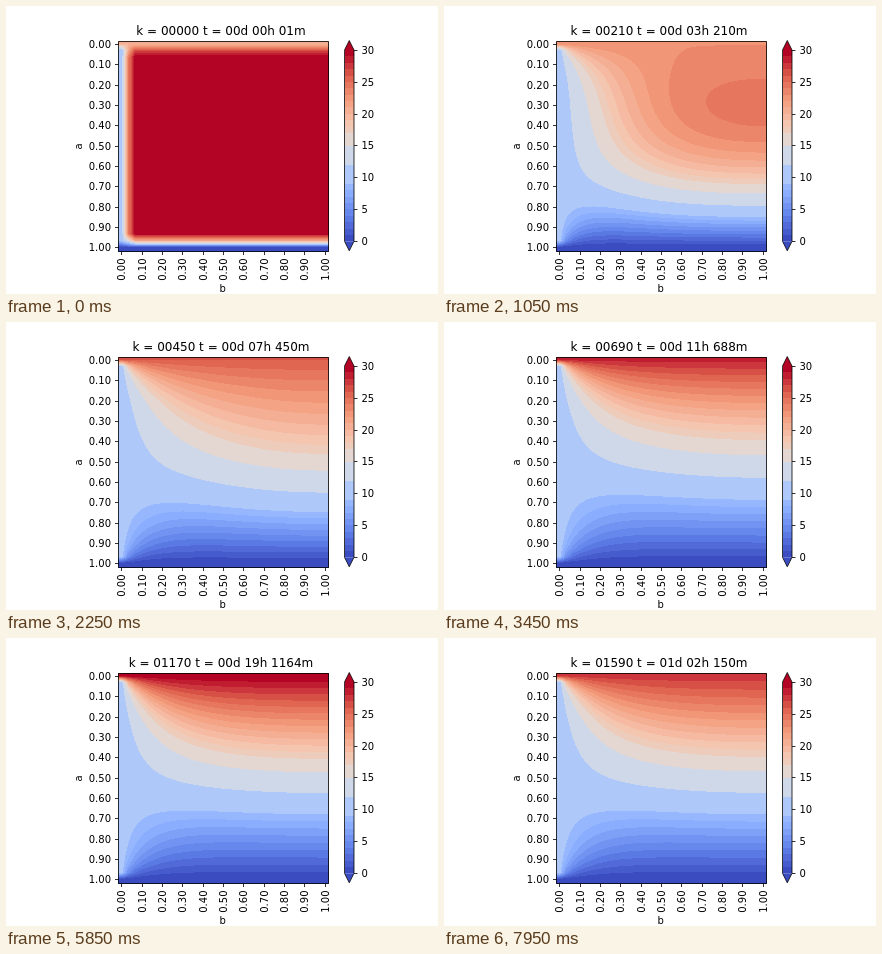
Recreate the animation shown at these times as an HTML page with a canvas. Size 432 by 288 pixels, loop 8 s.

```html
<!DOCTYPE html>
<html lang="en">
<head>
<meta charset="utf-8">
<title>Heat diffusion</title>
<style>
html, body { margin: 0; width: 100%; height: 100%; overflow: hidden; background: #fff; }
#stage { position: relative; width: 432px; height: 288px; overflow: hidden; }
#field { position: absolute; left: 112px; top: 35px; }
svg { position: absolute; left: 0; top: 0; }
text { font: 10px "DejaVu Sans", sans-serif; fill: #000; white-space: pre; }
#title { font-size: 12px; }
.line { fill: none; stroke: #000; stroke-width: 0.8; }
</style>
</head>
<body>
<div id="stage">
  <canvas id="field" width="211" height="211"></canvas>
  <svg id="chart" width="432" height="288" viewBox="0 0 432 288">
    <text id="title" x="215" y="28.5" text-anchor="middle"></text>
    <text x="216.7" y="286" text-anchor="middle">b</text>
    <text transform="translate(76 140.5) rotate(-90)" text-anchor="middle">a</text>
  </svg>
</div>
<script>
const LOOP = 8000, HOLD = 150, FRAMES = 54, STRIDE = 30;
const N = 31, LEVELS = 30;
const LEFT = 112.08, TOP = 34.56, SIZE = 210.24, CELL = SIZE / N;
const FLOW = 0.3;       // diffusion number per minute
const OMEGA = 0.00143;  // surface swing, radians per minute

// ---- colours ----
const STOPS = [
  [59, 76, 192], [98, 130, 234], [141, 176, 254], [184, 208, 249], [221, 221, 221],
  [245, 196, 173], [244, 154, 123], [222, 96, 77], [180, 4, 38]
];

function ramp(f) {
  const p = f * (STOPS.length - 1);
  const i = Math.min(Math.floor(p), STOPS.length - 2);
  return STOPS[i].map((c, j) => Math.round(c + (STOPS[i + 1][j] - c) * (p - i)));
}

// The pale middle levels share tones.
function tone(i) {
  if (i >= 9 && i < 12) return 10;
  if (i >= 12 && i < 15) return 13;
  if (i === 15 || i === 16) return 15.5;
  return i;
}

const palette = Array.from({ length: LEVELS }, (_, i) => ramp(tone(i) / (LEVELS - 1)));
const rgb = c => `rgb(${c.join()})`;

// ---- simulation ----
function edges(u, minute) {
  for (let i = 0; i < N; i++) u[i * N] = 10;
  for (let j = 0; j < N; j++) {
    u[j] = 20 + 10 * Math.sin(OMEGA * minute);
    u[(N - 1) * N + j] = 0;
  }
}

function diffuse(u, r) {
  const v = u.slice();
  for (let i = 1; i < N - 1; i++) {
    for (let j = 1; j < N; j++) {
      const p = i * N + j;
      const right = j < N - 1 ? u[p + 1] : u[p - 1];
      v[p] = u[p] + r * (u[p - N] + u[p + N] + u[p - 1] + right - 4 * u[p]);
    }
  }
  return v;
}

function simulate() {
  const shots = [];
  let u = new Float64Array(N * N).fill(30);
  for (let k = 0; shots.length < FRAMES; k++) {
    edges(u, k);
    if (k === 0) u = diffuse(u, FLOW);
    else u = diffuse(diffuse(u, FLOW / 2), FLOW / 2);
    if (k % STRIDE === 0) shots.push(u);
  }
  return shots;
}

// ---- field ----
const canvas = document.getElementById("field");
const ctx = canvas.getContext("2d");
const image = ctx.createImageData(canvas.width, canvas.height);

function weights(count, start) {
  return Array.from({ length: count }, (_, n) => {
    const p = Math.max(0, Math.min(N - 1, (n + 0.5 + start) / CELL - 0.5));
    const i = Math.min(Math.floor(p), N - 2);
    return { i, f: p - i };
  });
}
const cols = weights(canvas.width, 112 - LEFT);
const rows = weights(canvas.height, 35 - TOP);

function paint(u) {
  let q = 0;
  for (const y of rows) {
    for (const x of cols) {
      const p = y.i * N + x.i;
      const a = u[p] + (u[p + 1] - u[p]) * x.f;
      const b = u[p + N] + (u[p + N + 1] - u[p + N]) * x.f;
      const level = Math.floor((a + (b - a) * y.f) * LEVELS / 30 + 1e-6);
      const c = palette[Math.max(0, Math.min(LEVELS - 1, level))];
      image.data[q++] = c[0];
      image.data[q++] = c[1];
      image.data[q++] = c[2];
      image.data[q++] = 255;
    }
  }
  ctx.putImageData(image, 0, 0);
}

// ---- axes ----
const chart = document.getElementById("chart");

function add(tag, attrs, content) {
  const el = document.createElementNS("http://www.w3.org/2000/svg", tag);
  for (const name in attrs) el.setAttribute(name, attrs[name]);
  if (content !== undefined) el.textContent = content;
  chart.appendChild(el);
}
const line = d => add("path", { class: "line", d });
const snap = v => Math.round(v) + 0.5;

function drawAxes() {
  line("M112.5 35.5H322.5V245.5H112.5Z");
  for (let n = 0; n <= 10; n++) {
    const offset = CELL * (0.5 + 3 * n);
    const x = snap(LEFT + offset - 0.1), y = snap(TOP + offset - 0.1);
    const label = (n / 10).toFixed(2);
    line(`M${x} 245.5v3.5`);
    line(`M112.5 ${y}h-3.5`);
    add("text", { x: 105, y: y + 3.5, "text-anchor": "end" }, label);
    add("text", { transform: `translate(${x + 3.5} 252.5) rotate(-90)`, "text-anchor": "end" }, label);
  }
}

function drawScale() {
  const x0 = 338.5, x1 = 348, mid = (x0 + x1) / 2;
  const low = 235.25, high = 44.1, step = (low - high) / LEVELS;
  palette.forEach((c, i) => add("rect", {
    x: x0, y: low - step * (i + 1), width: x1 - x0, height: step,
    fill: rgb(c), "shape-rendering": "crispEdges"
  }));
  add("path", { d: `M${x0} ${high}L${mid} ${TOP}L${x1} ${high}Z`, fill: rgb(palette[LEVELS - 1]) });
  add("path", { d: `M${x0} ${low}L${mid} 244.8L${x1} ${low}Z`, fill: rgb(palette[0]) });
  line(`M${x0} ${low}V${high}L${mid} ${TOP}L${x1} ${high}V${low}L${mid} 244.8Z`);
  for (let v = 0; v <= 30; v += 5) {
    const y = snap(low - (low - high) * v / 30 - 0.3);
    line(`M${x1} ${y}h3.5`);
    add("text", { x: 355.5, y: y + 3.5 }, v);
  }
}

// ---- title ----
const title = document.getElementById("title");
const pad = (v, n) => String(v).padStart(n, "0");

function caption(k) {
  const total = k + 1;
  const day = Math.floor(total / 1440);
  const rest = total % 1440;
  const hour = Math.floor(rest / 60);
  const minute = Math.floor(rest - hour * hour / 60);
  return `k = ${pad(k, 5)} t = ${pad(day, 2)}d ${pad(hour, 2)}h ${pad(minute, 2)}m`;
}

// ---- playback ----
const shots = simulate();
let shown = -1;

function show(time) {
  const n = Math.min(FRAMES - 1, Math.floor((time % LOOP) / HOLD));
  if (n === shown) return;
  shown = n;
  paint(shots[n]);
  title.textContent = caption(n * STRIDE);
}

drawAxes();
drawScale();
show(0);

let start;
function tick(now) {
  if (start === undefined) start = now;
  show(Math.max(0, now - start));
  requestAnimationFrame(tick);
}
requestAnimationFrame(tick);
</script>
</body>
</html>
```
